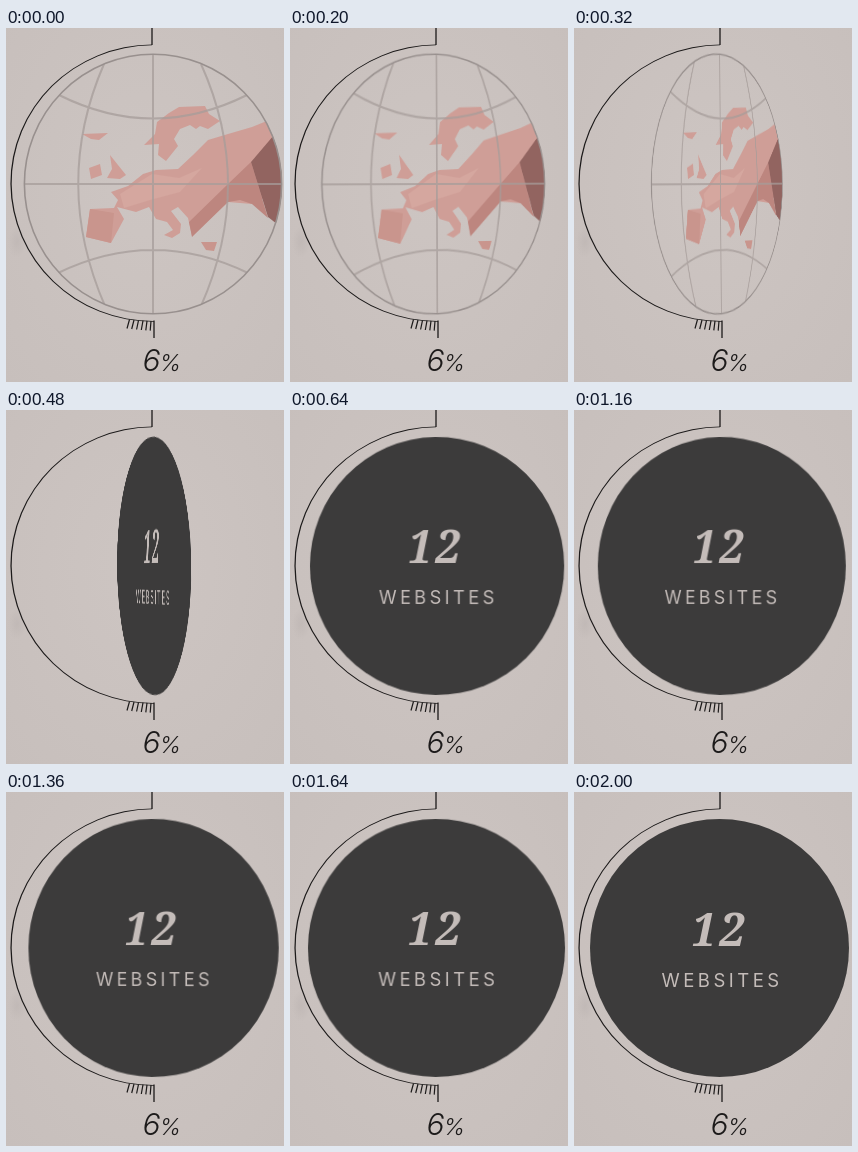
Write an HTML page that moves like this. It is 278 px wide and 354 px high and loops after 2080 ms.

```html
<!DOCTYPE html>
<html lang="en">
<head>
<meta charset="utf-8">
<title>Flip card</title>
<style>
html, body { margin: 0; width: 100%; height: 100%; overflow: hidden; }
body {
  position: relative;
  background:
    radial-gradient(ellipse 9px 16px at 11px 214px, #b9b1af80, #b9b1af00),
    radial-gradient(ellipse at 50% 45%, #cdc5c2, #c7bfbc);
}
svg { position: absolute; left: 0; top: 0; width: 278px; height: 354px; }
.stage { position: absolute; left: 0; top: 0; width: 278px; height: 354px;
  perspective: 2000px; perspective-origin: 146px 156px; }
.face { transform-origin: 146px 156px; }
.land { filter: blur(.6px); }
</style>
</head>
<body>
<svg viewBox="0 0 278 354">
  <g fill="none" stroke="#1c1a1a" stroke-width="1.3">
    <path d="M146 0V17M148 292.5V310"/>
    <path stroke-width="1.2" d="M123.5 291.5L121 300.5M128 292L125.7 301M132.5 292.3L130.6 301.5M137 292.6L135.3 302M141 292.8L139.8 302.3M145 293L144.2 302.6"/>
  </g>
  <path fill="#1c1a1a" d="M146 16.5A142.6 138.6 0 0 0 148 293.7V292.9A141.4 137.8 0 0 1 146 17.3Z"/>
  <g fill="#1c1a1a" font-family="Inter, sans-serif" font-style="italic" font-weight="300">
    <text x="136.5" y="343" font-size="30">6</text>
    <text x="153.5" y="343" font-size="23">%</text>
  </g>
</svg>

<div class="stage">
  <svg class="face" id="globe" viewBox="0 0 278 354">
    <clipPath id="rim"><ellipse cx="147" cy="156" rx="129" ry="130"/></clipPath>
    <g clip-path="url(#rim)">
      <g class="land">
        <g fill="#cf9e97">
          <path d="M76 106L102 105L93 112L85 111ZM83 140L94 136L96 147L85 151ZM104 127L120 147L114 151L101 150L106 141Z"/>
          <path d="M138 117L149 106L151 94L163 85L173 79L199 78L203 86L214 93L202 101L194 98L190 101L184 97L174 101L168 111L172 118L160 133L152 127L153 116Z"/>
          <path d="M137 146L150 142L172 141L187 127L202 112L222 106L246 99L278 86V160L246 176L222 174L186 208L182 190L172 179L165 183L175 196L174 205L166 210L158 207L167 202L161 194L150 191L143 179L130 184L111 179L118 191L105 215L80 209L84 181L108 180L112 172L105 164L122 158Z"/>
        </g>
        <path fill="#bd867f" d="M222 156L245 134L262 190L246 176L234 172L222 174L186 209L183 194Z"/>
        <path fill="#c9958d" d="M80 209L84 181L108 185L105 215ZM195 214L211 214L208 223L200 222Z"/>
        <path fill="#d5a79f" d="M114 166L146 146L173 150L196 140L174 164L144 172L118 180Z"/>
        <path fill="#926460" d="M245 134L268 107H280V196H271L262 189Z"/>
      </g>
      <path fill="none" stroke="#a69d9a" stroke-opacity=".75" stroke-width="2" d="M18 156H276M147 26V286M98 36Q46 156 99 278M195 36Q249 156 195 278M53 67Q147 114 241 67M52 245Q147 199 242 245"/>
    </g>
    <ellipse cx="147" cy="156" rx="128.6" ry="129.8" fill="none" stroke="#98908e" stroke-width="1.6"/>
  </svg>
  <svg class="face" id="disc" viewBox="0 0 278 354">
    <ellipse cx="145.5" cy="156" rx="129.5" ry="129" fill="#3c3b3b"/>
    <g fill="#c4bcb9">
      <text x="117" y="153.5" font-family="'Noto Serif', serif" font-style="italic" font-weight="600" font-size="45" letter-spacing="3">12</text>
      <text x="87.5" y="194.5" font-family="Inter, sans-serif" font-size="18.5" letter-spacing="3.5">WEBSITES</text>
    </g>
  </svg>
</div>

<script>
const LOOP = 2080, STEP = 40;
// time (ms), angle (deg), speed (deg/ms)
const KEYS = [
  [40, 0, .1], [200, 30, .23], [480, 106.6, .33], [640, 169, .41],
  [780, 198, 0], [1180, 163, 0], [2000, 180, 0]
];
const globe = document.getElementById('globe');
const disc = document.getElementById('disc');

function angleAt(t) {
  if (t <= KEYS[0][0]) return 0;
  const i = KEYS.findIndex(k => t <= k[0]);
  if (i < 0) return 180;
  const [t0, a0, v0] = KEYS[i - 1], [t1, a1, v1] = KEYS[i];
  const d = t1 - t0, u = (t - t0) / d, w = 1 - u;
  return w * w * ((1 + 2 * u) * a0 + u * d * v0)
       + u * u * ((3 - 2 * u) * a1 - w * d * v1);
}

function show(face, visible, angle, tilt) {
  face.style.visibility = visible ? 'visible' : 'hidden';
  face.style.transform = `rotateZ(${tilt}deg) rotateY(${angle}deg)`;
}

const start = performance.now();
function draw() {
  const now = (performance.now() - start) % LOOP;
  const angle = angleAt(Math.floor(now / STEP) * STEP);
  const tilt = -.4 * Math.sin(angle * Math.PI / 180);
  show(globe, angle < 90, angle, tilt);
  show(disc, angle >= 90, angle - 180, tilt);
  requestAnimationFrame(draw);
}
draw();
</script>
</body>
</html>
```
